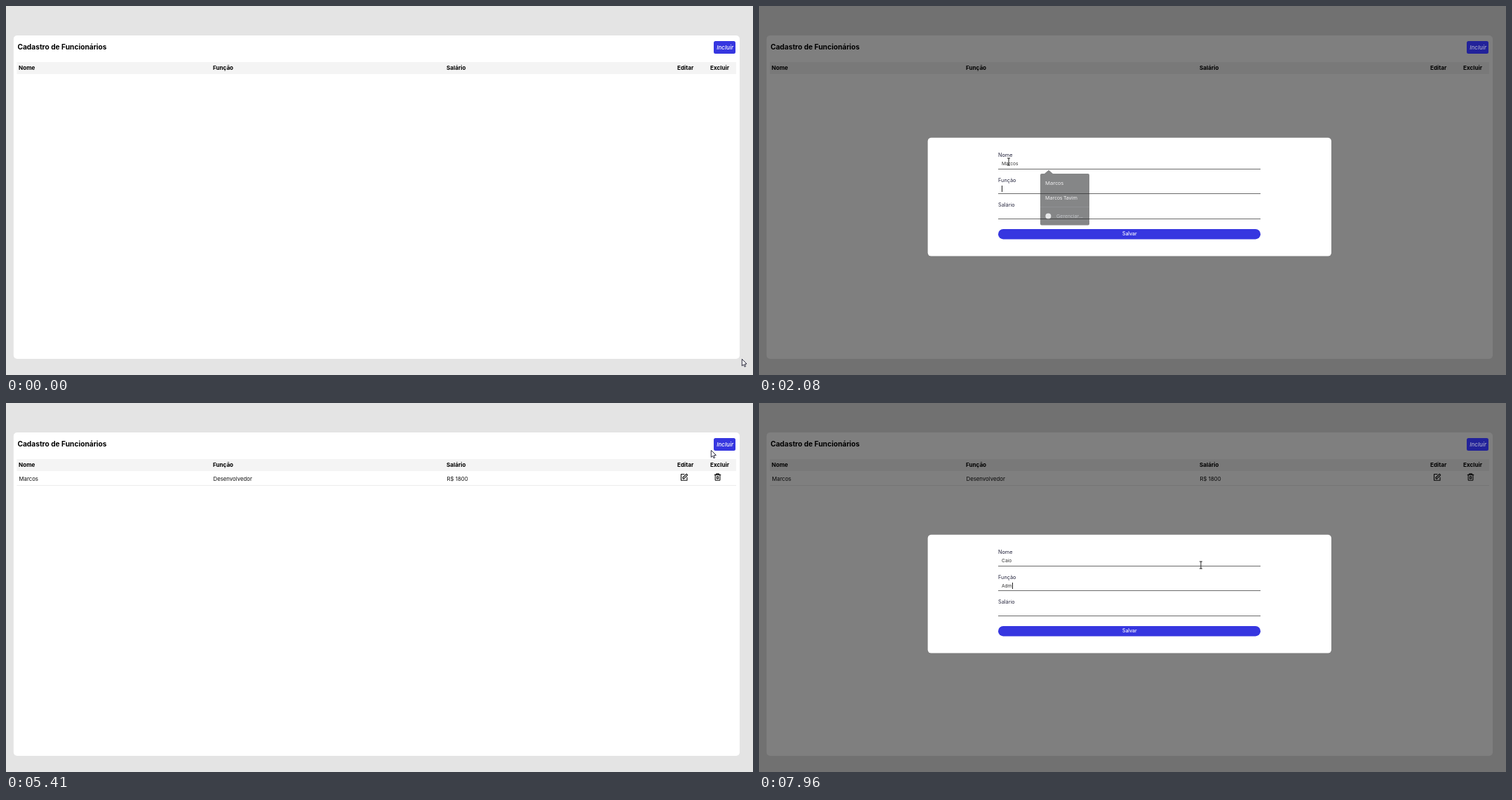
These frames come from a looping animation (1065x526 px, 7990 ms). An HTML page with a canvas:

```html
<!DOCTYPE html>
<html lang="pt-BR">
<head>
<meta charset="utf-8">
<title>Cadastro de Funcionários</title>
<style>
  html, body { margin: 0; width: 100%; height: 100%; overflow: hidden; background: #e4e4e4; }
  canvas { display: block; width: 1065px; height: 526px; }
</style>
</head>
<body>
<canvas id="stage"></canvas>
<script>
const W = 1065, H = 526, LOOP = 7990;
const SANS = 'Inter, "Open Sans", sans-serif';
const MENU = '"Open Sans", "Noto Sans", sans-serif';
const BLUE = '#3636e0';
const ROW = 35.4;

const dpr = window.devicePixelRatio || 1;
const stage = document.getElementById('stage');
const layer = document.createElement('canvas');
for (const c of [stage, layer]) {
  c.width = W * dpr;
  c.height = H * dpr;
}
const base = stage.getContext('2d');
let ctx = base;

// Timeline, in ms
const OPENED = [332, 5747], SAVED = 5110;
const CLICKS = [280, 840, 5020, 5680, 6580];
const VISITS = [
  { field: 0, focus: 910, text: 'Marcos', start: 1420, end: 1780, hide: 2000 },
  { field: 1, focus: 2050, text: 'Desenvolvedor', start: 2350, end: 3650 },
  { field: 2, focus: 3730, text: '1800', start: 4270, end: 4480 },
  { field: 0, focus: 6670, text: 'Caio', start: 6910, end: 7120, hide: 6900 },
  { field: 1, focus: 7360, text: 'Adm', start: 7810, end: 7960 }
];
const MOVES = [
  { start: 10, end: 280, x: 1023, y: 55 },
  { start: 500, end: 820, x: 356, y: 222 },
  { start: 4710, end: 5010, x: 565, y: 328 },
  { start: 5110, end: 5450, x: 1022.5, y: 57 },
  { start: 5790, end: 6010, x: 605, y: 251 },
  { start: 6450, end: 6580, x: 630, y: 231 }
];

const clamp = v => Math.max(0, Math.min(1, v));
const progress = (t, a, b) => clamp((t - a) / (b - a));
const smooth = p => p * p * (3 - 2 * p);

// The CSS "ease" curve: cubic-bezier(.25, .1, .25, 1)
function ease(x) {
  const curve = (s, a, b) => 3 * a * s * (1 - s) ** 2 + 3 * b * s * s * (1 - s) + s ** 3;
  let lo = 0, hi = 1;
  for (let i = 0; i < 20; i++) {
    const mid = (lo + hi) / 2;
    if (curve(mid, .25, .25) < x) lo = mid; else hi = mid;
  }
  return curve(lo, .1, 1);
}

function box(x, y, w, h, r, color) {
  ctx.fillStyle = color;
  ctx.beginPath();
  ctx.roundRect(x, y, w, h, r);
  ctx.fill();
}

function outline(x, y, w, h, r) {
  ctx.beginPath();
  ctx.roundRect(x, y, w, h, r);
  ctx.stroke();
}

function line(...points) {
  ctx.beginPath();
  for (let i = 0; i < points.length; i += 2) ctx.lineTo(points[i], points[i + 1]);
}

function label(str, x, y, size, color, weight = 400, family = SANS) {
  ctx.font = `${weight} ${size}px ${family}`;
  ctx.fillStyle = color;
  ctx.fillText(str, x, y);
}

// Paints a whole group with one shared opacity
function group(alpha, paint) {
  ctx = layer.getContext('2d');
  ctx.setTransform(dpr, 0, 0, dpr, 0, 0);
  ctx.clearRect(0, 0, W, H);
  paint();
  ctx = base;
  ctx.globalAlpha = alpha;
  ctx.drawImage(layer, 0, 0, W, H);
  ctx.globalAlpha = 1;
}

// Typing starts hesitantly and speeds up
const keyTime = (v, i) => v.start + (v.end - v.start) * (i / (v.text.length - 1)) ** .65;
const typedCount = (v, t) => [...v.text].filter((_, i) => keyTime(v, i) <= t).length;

function fieldText(t, field) {
  const visit = VISITS.find(v => v.field === field && v.focus > SAVED === t >= SAVED);
  return visit ? visit.text.slice(0, typedCount(visit, t)) : '';
}

function drawCaret(t, field, text, y) {
  const visit = VISITS.filter(v => v.focus <= t).pop();
  if (!visit || visit.field !== field || CLICKS.some(c => c > visit.focus && c <= t)) return;
  const count = typedCount(visit, t);
  const last = count ? keyTime(visit, count - 1) : visit.focus;
  if (Math.floor((t - last) / 240) % 2) return;
  box(Math.round(346 + ctx.measureText(text).width), y, 1, 9, 0, '#222');
}

function drawIcons() {
  ctx.strokeStyle = '#111';
  ctx.lineWidth = 1.1;
  ctx.lineJoin = ctx.lineCap = 'round';
  // Pencil on a sheet
  line(967, 101.5, 962.5, 101.5, 962.5, 110.3, 971, 110.3, 971, 106);
  ctx.stroke();
  ctx.save();
  ctx.translate(965.3, 107.5);
  ctx.rotate(-Math.PI / 4);
  outline(0, -1.1, 8, 2.2, .3);
  ctx.restore();
  // Bin
  line(1010.3, 102.4, 1018.8, 102.4);
  ctx.stroke();
  outline(1012.7, 100.7, 3.7, 1.7, .4);
  outline(1011.2, 102.4, 6.7, 7.9, .6);
  outline(1013.5, 104.8, 2.1, 3.2, 0);
}

function drawPage(t) {
  box(0, 0, W, H, 0, '#e4e4e4');
  box(10.8, 42, 1035.2, 461, 5, '#fff');
  label('Cadastro de Funcionários', 16.4, 62.4, 10.2, '#000', 700);
  box(15.5, 80, 1025.5, 17, 0, '#f4f4f4');
  const columns = { Nome: 18, Função: 295, Salário: 628, Editar: 957, Excluir: 1004 };
  for (const name in columns) label(name, columns[name], 90.7, 8.1, '#000', 700);
  if (t < SAVED) return;
  ['Marcos', 'Desenvolvedor', 'R$ 1800'].forEach((str, i) => {
    label(str, Object.values(columns)[i] + .5, 110.9, 7.8, '#111');
  });
  box(15.5, 117, 1025.5, 1, 0, '#ececec');
  drawIcons();
}

function drawInclude(open) {
  box(1009, 50, 31, 18, 2.5, open ? '#22229a' : BLUE);
  label('Incluir', 1013.3, 61.5, 8.1, open ? '#a4a4c8' : '#fff', 'italic 500');
}

function drawModal(t) {
  box(240.6, 187.8, 575.4, 168.8, 5, '#fff');
  ['Nome', 'Função', 'Salário'].forEach((name, i) => {
    const y = ROW * i, text = fieldText(t, i);
    label(name, 341, 215.4 + y, 7.3, '#26263e');
    label(text, 346, 227.3 + y, 6.7, '#333');
    box(341, Math.round(232 + y), 374, 1, 0, '#6a6a6a');
    drawCaret(t, i, text, Math.round(221 + y));
  });
  box(341, 318, 374, 14.4, 7.2, BLUE);
  label('Salvar', 518, 327.4, 6.9, '#fff', 500);
}

function drawMenu() {
  box(401, 239, 70, 73.5, 2, '#2a2b2e');
  line(407, 239, 413, 233.8, 419, 239);
  ctx.fill();
  label('Marcos', 408, 255.2, 7.7, '#f4f4f4', 400, MENU);
  label('Marcos Tavim', 408, 276.3, 7.2, '#f4f4f4', 400, MENU);
  box(401, 286, 70, 1, 0, '#3c3d41');
  box(408.4, 295.6, 8, 8, 4, '#d6d7d9');
  label('Gerenciar...', 424, 302.4, 7.1, '#9aa0a6', 400, MENU);
}

function pointerAt(t) {
  let x = 1049, y = 503;
  for (const m of MOVES) {
    const p = smooth(progress(t, m.start, m.end));
    x += (m.x - x) * p;
    y += (m.y - y) * p;
  }
  return [x, y];
}

function pointerKind(x, y, open) {
  if (!open) return x > 1009 && x < 1040 && y > 50 && y < 68 ? 'hand' : 'arrow';
  if (x < 341 || x > 715) return 'arrow';
  if (y > 318 && y < 332.4) return 'hand';
  const row = (y - 218) / ROW;
  return row >= 0 && row < 3 && (row % 1) * ROW < 15 ? 'beam' : 'arrow';
}

function drawPointer(t, open) {
  const [x, y] = pointerAt(t);
  if (CLICKS.some(c => t >= c && t < c + 70)) {
    box(x - 7.2, y - 7.2, 14.4, 14.4, 7.2, 'rgba(190,190,70,.62)');
  }
  ctx.save();
  ctx.translate(x, y);
  ctx.lineJoin = 'round';
  ctx.strokeStyle = '#15152a';
  ctx.lineWidth = .9;
  const kind = pointerKind(x, y, open);
  if (kind === 'beam') {
    box(-.5, -5, 1, 10, 0, '#222');
    for (const edge of [-5.5, 4.5]) box(-2, edge, 4, 1, 0, '#222');
  } else if (kind === 'hand') {
    const parts = [[-1, .5, 2, 10, 1], [-3, 7.5, 4, 3, 1], [-1, 5.2, 7, 8, 2]];
    ctx.lineWidth = 1.8;
    for (const p of parts) outline(...p);
    for (const p of parts) box(...p, '#fff');
  } else {
    line(.3, .3, .3, 10, 2.5, 8, 4.1, 11.3, 5.6, 10.6, 4.1, 7.4, 7, 7.1);
    ctx.closePath();
    ctx.fillStyle = '#fff';
    ctx.fill();
    ctx.stroke();
  }
  ctx.restore();
}

function draw(t) {
  base.setTransform(dpr, 0, 0, dpr, 0, 0);
  const start = OPENED[+(t >= OPENED[1])];
  const open = t >= start && !(t >= SAVED && t < OPENED[1]);
  drawPage(t);
  if (open) box(0, 0, W, H, 0, 'rgba(0,0,0,.5)');
  drawInclude(open);
  if (open) {
    const p = ease(progress(t, start, start + 260));
    group(p, () => {
      ctx.translate(0, -28.3 * (1 - p));
      drawModal(t);
    });
    for (const { focus, hide } of VISITS) {
      const shown = progress(t, focus - 40, focus + 90) * (1 - progress(t, hide, hide + 140) ** 1.5);
      if (hide && shown) group(shown, drawMenu);
    }
  }
  drawPointer(t, open);
}

let began;
function tick(now) {
  began ??= now;
  draw(Math.max(0, now - began) % LOOP);
  requestAnimationFrame(tick);
}
draw(0);
requestAnimationFrame(tick);
</script>
</body>
</html>
```
